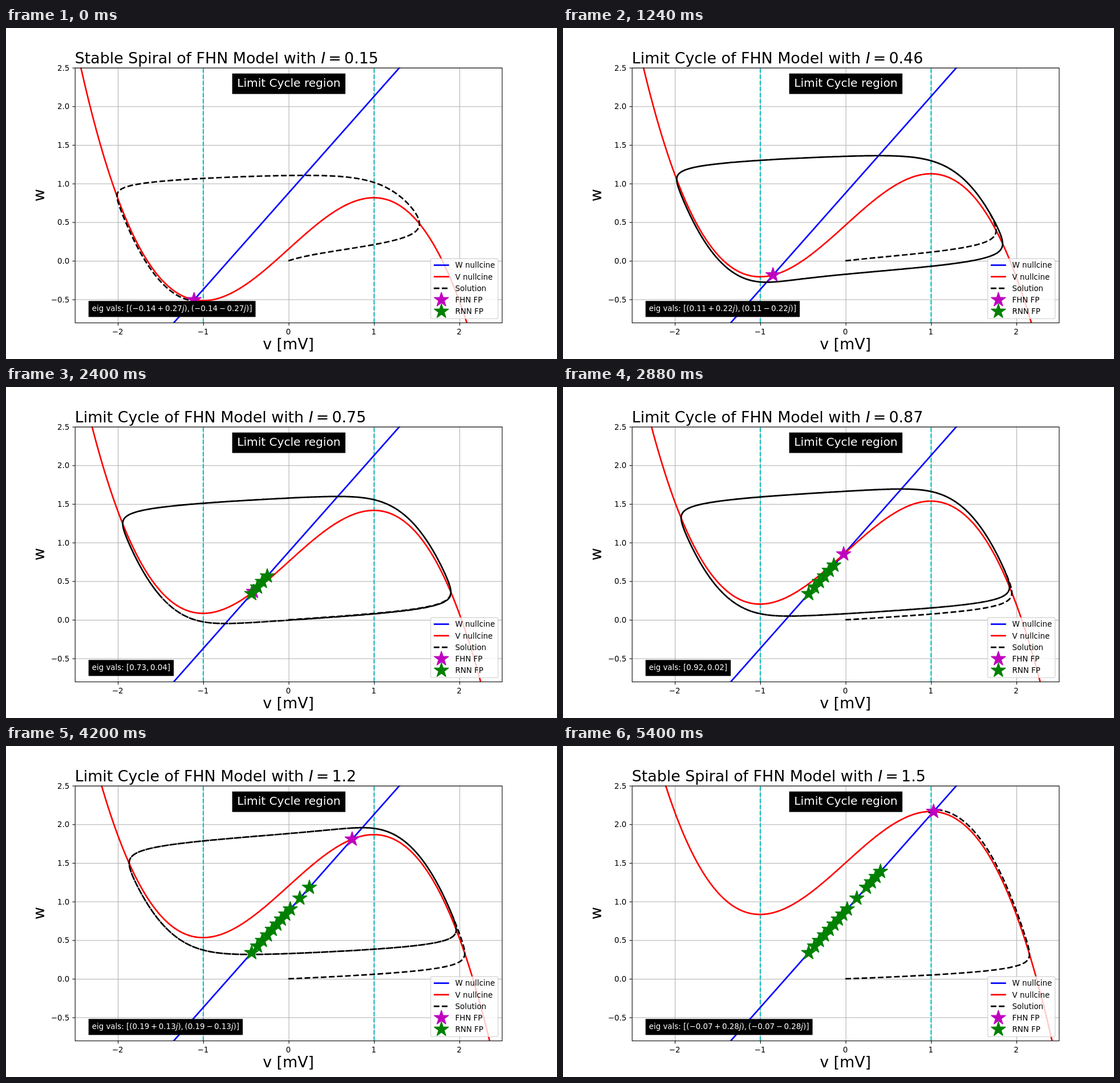
Animation of 966x580 px, one loop 5.44 s. Source, as an HTML page with a canvas:

```html
<!DOCTYPE html>
<html lang="en">
<head>
<meta charset="utf-8">
<title>FHN phase plane</title>
<style>
html, body { margin: 0; width: 100%; height: 100%; overflow: hidden; background: #fff; }
canvas { display: block; width: 966px; height: 580px; }
</style>
</head>
<body>
<canvas id="stage" width="966" height="580"></canvas>
<script>
const ctx = document.getElementById("stage").getContext("2d");

// The figure is laid out on a 1000 x 600 sheet at 100 dpi.
const PT = 100 / 72;
const LEFT = 125, RIGHT = 900, TOP = 72, BOTTOM = 534;
const STEP_MS = 40, STEPS = 136;
const A = 0.7, B = 0.8, EPS = 0.08, T_END = 100, DT = 0.05;
const MAGENTA = "#bf00bf", GREEN = "#008000";

const px = v => 512.5 + v * 155;
const py = w => 422 - w * 140;
const snap = x => Math.floor(x + 0.5) + 0.5;

// Network fixed points: [input current at which found, v]
const found = [
  [0.60, -0.430], [0.65, -0.362], [0.70, -0.305], [0.75, -0.247], [0.80, -0.190],
  [0.85, -0.135], [0.90, -0.083], [0.95, -0.032], [1.00, 0.022], [1.10, 0.134],
  [1.20, 0.246], [1.25, 0.303], [1.30, 0.358], [1.35, 0.411]
];

const wNull = v => (v + A) / B;
const vNull = (v, I) => v - v * v * v / 3 + I;

function fixedPoint(I) {
  const c = 3 * (A / B - I), p = 3 * (1 / B - 1);
  let v = 0;
  for (let i = 0; i < 60; i++) v -= (v * v * v + p * v + c) / (3 * v * v + p) * (i < 20 ? 0.5 : 1);
  return v;
}

function solve(I) {
  const dv = (v, w) => vNull(v, I) - w;
  const dw = (v, w) => EPS * (v + A - B * w);
  const path = [[0, 0]];
  let v = 0, w = 0;
  for (let i = 0; i < T_END / DT; i++) {
    const h = DT / 2;
    const a = dv(v, w), p = dw(v, w);
    const b = dv(v + h * a, w + h * p), q = dw(v + h * a, w + h * p);
    const c = dv(v + h * b, w + h * q), r = dw(v + h * b, w + h * q);
    const d = dv(v + DT * c, w + DT * r), s = dw(v + DT * c, w + DT * r);
    v += DT * (a + 2 * b + 2 * c + d) / 6;
    w += DT * (p + 2 * q + 2 * r + s) / 6;
    path.push([v, w]);
  }
  return path;
}

function line(points, color, pt, dashed) {
  const width = pt * PT;
  ctx.beginPath();
  for (const [x, y] of points) ctx.lineTo(x, y);
  ctx.strokeStyle = color;
  ctx.lineWidth = width;
  ctx.lineJoin = "round";
  ctx.setLineDash(dashed ? [3.7 * width, 1.6 * width] : []);
  ctx.stroke();
  ctx.setLineDash([]);
}

function star(x, y, color) {
  ctx.beginPath();
  for (let i = 0; i < 10; i++) {
    const r = 10 * PT * (i % 2 ? 0.381966 : 1), a = i * Math.PI / 5;
    ctx.lineTo(x + r * Math.sin(a), y - r * Math.cos(a));
  }
  ctx.closePath();
  ctx.fillStyle = ctx.strokeStyle = color;
  ctx.lineWidth = PT;
  ctx.lineJoin = "bevel";
  ctx.fill();
  ctx.stroke();
}

function setFont(pt, italic) {
  ctx.font = (italic ? "italic " : "") + pt * PT + 'px "DejaVu Sans", Verdana, sans-serif';
}

function text(str, x, y, pt, align = "left", color = "#000") {
  setFont(pt);
  ctx.textAlign = align;
  ctx.fillStyle = color;
  ctx.fillText(str, x, y);
}

// Strings are upright, except single letters; numbers are spaces in em.
function mathText(parts, x, y, pt, color, measureOnly) {
  ctx.textAlign = "left";
  ctx.fillStyle = color;
  for (const part of parts) {
    if (typeof part === "number") { x += part * pt * PT; continue; }
    setFont(pt, /^[a-zA-Z]$/.test(part));
    if (!measureOnly) ctx.fillText(part, x, y);
    x += ctx.measureText(part).width;
  }
  return x;
}

const GAP = 0.195;
const round2 = x => Math.round(x * 100) / 100;
const num = x => String(x).replace("-", "\u2212");

function eigen(v) {
  const a = 1 - v * v, d = -EPS * B;
  const mid = (a + d) / 2, disc = mid * mid - (a * d + EPS);
  return { mid, disc, root: Math.sqrt(Math.abs(disc)) };
}

function eigenParts({ mid, disc, root }) {
  if (disc >= 0) {
    return ["[" + num(round2(mid + root)) + ",", GAP, num(round2(mid - root)) + "]"];
  }
  const re = round2(mid), im = num(round2(root));
  const real = Object.is(re, -0) ? "\u22120" : num(re);
  const pair = sign => ["(" + real, GAP, sign, GAP, im, "j", ")"];
  return ["[", ...pair("+"), ",", GAP, ...pair("\u2212"), "]"];
}

function axes() {
  for (let v = -2; v <= 2; v++) {
    const x = snap(px(v));
    line([[x, TOP], [x, BOTTOM]], "#b0b0b0", 0.8);
    line([[x, BOTTOM], [x, BOTTOM + 5.4]], "#000", 0.8);
    text(num(v), px(v), 555, 10, "center");
  }
  for (let i = -1; i <= 5; i++) {
    const y = snap(py(i / 2));
    line([[LEFT, y], [RIGHT, y]], "#b0b0b0", 0.8);
    line([[LEFT, y], [LEFT - 4.4, y]], "#000", 0.8);
    text((i / 2).toFixed(1).replace("-", "\u2212"), 115.3, py(i / 2) + 5.2, 10, "right");
  }
  text("v [mV]", 512.5, 582.5, 20, "center");
  ctx.save();
  ctx.translate(69.8, 303);
  ctx.rotate(-Math.PI / 2);
  text("w", 0, 0, 20, "center");
  ctx.restore();
}

function legend() {
  const x = 770.8, y = 418.2, hx = 776.3;
  ctx.beginPath();
  ctx.roundRect(x, y, 893 - x, 527 - y, 2.8);
  ctx.fillStyle = "rgba(255,255,255,0.8)";
  ctx.strokeStyle = "rgba(204,204,204,0.8)";
  ctx.lineWidth = PT;
  ctx.fill();
  ctx.stroke();
  const rowY = i => 429.9 + i * 20.94;
  const stroke = (i, color, dashed) =>
    line([[hx, rowY(i)], [hx + 27.8, rowY(i)]], color, 2, dashed);
  stroke(0, "#00f");
  stroke(1, "#f00");
  stroke(2, "#000", true);
  star(hx + 13.9, rowY(3), MAGENTA);
  star(hx + 13.9, rowY(4), GREEN);
  ["W nullcine", "V nullcine", "Solution", "FHN FP", "RNN FP"]
    .forEach((name, i) => text(name, 815.2, rowY(i) + 4.9, 10));
}

function box(x0, y0, x1, y1) {
  ctx.fillStyle = "#000";
  ctx.fillRect(x0, y0, x1 - x0, y1 - y0);
}

function draw(step) {
  const I = (15 + step) / 100;
  const fp = fixedPoint(I), eig = eigen(fp);

  ctx.setTransform(1, 0, 0, 1, 0, 0);
  ctx.fillStyle = "#fff";
  ctx.fillRect(0, 0, 966, 580);
  ctx.setTransform(0.966, 0, 0, 580 / 600, 0, 0);
  axes();

  ctx.save();
  ctx.beginPath();
  ctx.rect(LEFT, TOP, RIGHT - LEFT, BOTTOM - TOP);
  ctx.clip();
  const span = Array.from({ length: 501 }, (_, i) => i / 100 - 2.5);
  for (const v of [-1, 1]) {
    const x = Math.floor(px(v) + 0.5);
    line([[x, BOTTOM], [x, TOP]], "#00bfbf", 1.5, true);
  }
  line([-2.5, 2.5].map(v => [px(v), py(wNull(v))]), "#00f", 2);
  line(span.map(v => [px(v), py(vNull(v, I))]), "#f00", 2);
  line(solve(I).map(([v, w]) => [px(v), py(w)]), "#000", 2, true);
  star(px(fp), py(wNull(fp)), MAGENTA);
  for (const [at, v] of found) if (I >= at) star(px(v), py(wNull(v)), GREEN);
  ctx.restore();

  ctx.strokeStyle = "#000";
  ctx.lineWidth = 0.8 * PT;
  ctx.lineJoin = "miter";
  ctx.strokeRect(LEFT + 0.5, TOP + 0.5, RIGHT - LEFT, BOTTOM - TOP);

  const kind = eig.mid < 0 ? "Stable Spiral" : "Limit Cycle";
  const shown = Number.isInteger(I) ? I.toFixed(1) : String(I);
  mathText([kind + " of FHN Model with ", "I", GAP, "=", GAP, shown], 125, 63.7, 20, "#000");

  box(410.5, 82.5, 616, 119.6);
  text("Limit Cycle region", 419.5, 107, 15, "left", "#fff");

  const label = ["eig vals: ", ...eigenParts(eig)];
  box(149.8, 494.8, mathText(label, 156, 513, 10, "#fff", true) + 6.2, 523.8);
  mathText(label, 156, 513, 10, "#fff");

  legend();
}

const start = performance.now();
let last = -1;
function tick() {
  const step = Math.floor(Math.max(0, performance.now() - start) / STEP_MS) % STEPS;
  if (step !== last) draw(last = step);
  requestAnimationFrame(tick);
}
tick();
</script>
</body>
</html>
```
